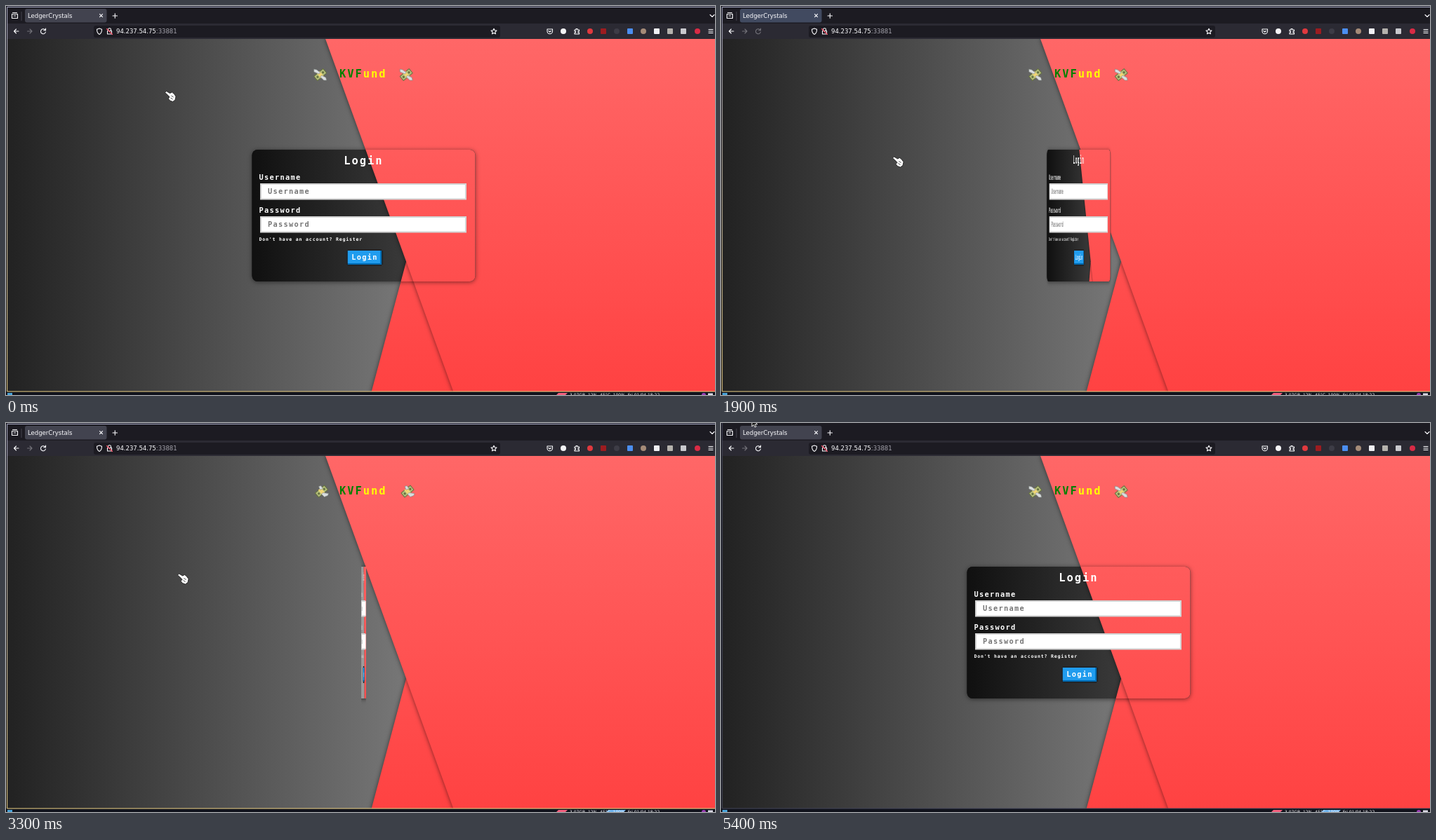
An HTML page that plays this animation: 1010x555 px, repeating every 5.5 s.

```html
<!DOCTYPE html>
<html lang="en">
<head>
<meta charset="utf-8">
<title>LedgerCrystals</title>
<style>
html, body { margin: 0; width: 100%; height: 100%; overflow: hidden; background: #1c1b22; }
svg { display: block; width: 1010px; height: 555px; }
text { font: 8.5px "DejaVu Sans", sans-serif; fill: #fbfbfe; white-space: pre; }
.px { font: bold 10.25px "DejaVu Sans Mono", monospace; letter-spacing: .13em; fill: #fff; }
.big { font-size: 15.4px; }
.small { font-size: 6.5px; }
.hint { fill: #757575; }
.tiny { font-size: 6px; }
.line { fill: none; stroke: #fbfbfe; stroke-width: 1.1; stroke-linecap: round; stroke-linejoin: round; }
.panel { fill: url(#red); filter: drop-shadow(0 0 3px rgba(0,0,0,.55)); }
.plate { filter: drop-shadow(0 1px 3px rgba(0,0,0,.5)); }
</style>
</head>
<body>
<svg id="stage" viewBox="0 0 1010 555"></svg>
<script>
const LOOP = 5500, STEP = 100, MID = 509.5;

const rect = (x, y, w, h, fill, r = 0, more = '') =>
  `<rect x="${x}" y="${y}" width="${w}" height="${h}" rx="${r}" fill="${fill}" ${more}/>`;
const dot = (x, y, r, fill) => `<circle cx="${x}" cy="${y}" r="${r}" fill="${fill}"/>`;
const line = (d, more = '') => `<path class="line" d="${d}" ${more}/>`;
const text = (x, y, s, cls = '', more = '') => `<text x="${x}" y="${y}" class="${cls}" ${more}>${s}</text>`;
const grad = (id, axis, from, to, c1, c2) => {
  const other = axis === 'x' ? 'y' : 'x';
  return `<linearGradient id="${id}" gradientUnits="userSpaceOnUse" ${axis}1="${from}" ${axis}2="${to}"
    ${other}1="0" ${other}2="0"><stop stop-color="${c1}"/><stop offset="1" stop-color="${c2}"/></linearGradient>`;
};

const scene = fill => rect(0, 47, 700, 504, fill) +
  '<path class="panel" d="M570 365L520.200 552H660V365z"/>' +
  '<path class="panel" d="M454.700 46H1020V552H638z"/>';

const field = (label, y) => text(360.5, y, label, 'px') +
  rect(363, y + 6, 292, 21.5, '#fff', 0, 'stroke="#d3d3d3" stroke-width="2"') +
  text(373, y + 20.3, label, 'px hint');

function card(id, title, note, fill) {
  const half = title.length * 3.75 + 7.4, x = 511 - half, w = half * 2;
  return `<g id="${id}">` +
    rect(350.5, 205, 318, 188, fill, 8, 'class="plate"') +
    `<g clip-path="url(#cardClip)">${scene(fill)}</g>` +
    text(MID + .5 - title.length * 5.75, 225.5, title, 'px big') +
    field('Username', 248) + field('Password', 295) +
    text(360.5, 335.3, note, 'px small') +
    rect(x + 2, 347, w - 4, 24, '#212529') + rect(x, 349, w, 20, '#212529') +
    rect(x + 2, 349, w - 4, 20, '#006bb3') + rect(x + 2, 349, w - 6, 18, '#209cee') +
    text(x + 7.5, 362.3, title, 'px') + '</g>';
}

// Winged banknote around its own centre; wings is a path
const note = wings =>
  '<g transform="rotate(-40)">' + rect(-9, -4.5, 18, 9, '#66733f', 1) + rect(-8, -3.5, 16, 7, '#b4bd7c') +
  rect(-2.5, -4.5, 5, 9, '#f2d675') + dot(5, 0, 1.6, '#66733f') + dot(-5, 0, 1.6, '#66733f') + '</g>' +
  `<path d="${wings}" fill="#d9dde0" stroke="#7f857c" stroke-width=".6"/>`;
const pair = (id, x, y, shape) => `<g id="${id}">` +
  [x, x + 122.5].map(p => `<g transform="translate(${p} ${y})">${shape}</g>`).join('') + '</g>';

const dots = [[794, '#f4f4f6'], [832, '#e0393e'], [870, '#3d3c46'], [908, '#a58b78'], [985, '#d92b45']];
const squares = [[851, '#9c1c20'], [889, '#4b8ef0'], [927, '#f0f0f4'], [946, '#b5b2ad'], [965, '#c9c9ce']];

const chrome =
  rect(0, 0, 1010, 26, '#1c1b22') + rect(0, 25, 1010, 22, '#2b2a33') +
  rect(27, 4, 116.5, 19.5, '#42434f', 3, 'id="tab"') + rect(21.5, 8, 1, 13, '#45444e') +
  line('M8.500 11.500h8v6h-8zM9.500 9.500h6M11 14h3') +
  text(31, 17, 'LedgerCrystals', '', 'id="label"') + `<g id="busy">${dot(33, 13.5, 1.3, '#a9b4d8')}</g>` +
  line('M133.500 11.700l4 4m0 -4l-4 4') + line('M152 14h6.500m-3.250 -3.250v6.500') + line('M1003 12.500l3 3 3 -3') +
  line('M18 36h-6.500m3 -3l-3 3 3 3') + line('M30.500 36h6.500m-3 -3l3 3 -3 3', 'opacity=".35"') +
  `<g id="reload">${line('M56 34.500a3.500 3.500 0 1 0 .400 2.500M56.500 32v2.800h-2.800')}</g>` +
  rect(125, 28, 579, 17, '#1c1b22', 3) +
  line('M133 32l3.500 1.300c0 4 -1 6 -3.500 7.200c-2.500 -1.200 -3.500 -3.200 -3.500 -7.200z') +
  line('M144.500 35.500h6v4.500h-6zM145.500 35v-1.200a2 2 0 0 1 4 0v1.200') + line('M143.500 32.500l8 8', 'style="stroke:#ff5068"') +
  text(157, 39.2, '94.237.54.75<tspan fill="#a5a4ad">:33881</tspan>') +
  line('M695 32.200l1.200 2.600 2.800 .300 -2.100 1.900 .600 2.800 -2.500 -1.400 -2.500 1.400 .600 -2.800 -2.100 -1.900 2.800 -.300z') +
  line('M771 33h7.500v3a3.700 3.700 0 0 1 -7.500 0zM773 35.500l1.700 1.700 1.700 -1.700') +
  line('M810 34h2v-1.500h2v1.500h2.500v2h-1.500v2h1.500v2h-6.500v-2h1.500v-2h-1.500z') +
  dots.map(([x, c]) => dot(x, 36, 4, c)).join('') +
  squares.map(([x, c]) => rect(x - 4, 32, 8, 8, c, 1)).join('') +
  line('M1001 33.500h6m-6 2.500h6m-6 2.500h6');

const footer =
  rect(0, 550, 1010, 5, '#11131c') + rect(2, 552, 7, 3, '#4aa3d8') +
  '<path d="M787 552h13l-3 3h-13z" fill="#f2607e"/>' +
  '<path id="load" d="M858 552h25l-3 3h-25z" fill="#6fb4ee"/>' +
  text(803, 557.3, '3.07GB  12%  45°C  100%  Fri 01/04 18:22', 'tiny') +
  dot(994, 555, 3, '#9b3fb5') + rect(1000, 552.5, 7, 3, '#d8d8e4');

stage.innerHTML = '<defs>' +
  grad('red', 'y', 47, 550, '#ff6767', '#ff4242') +
  grad('grey', 'x', 2, 570, '#222', '#777') +
  grad('dark', 'x', 351, 571, '#101010', '#3a3a3a') +
  grad('pale', 'x', 351, 571, '#999', '#9e9e9e') +
  grad('rim', 'y', 0, 550, '#aeb0cc', '#f0d486') +
  `<clipPath id="cardClip">${rect(350.5, 205, 318, 188, '#000', 8)}</clipPath></defs>` +
  scene('url(#grey)') +
  text(475, 101.7, '<tspan fill="#008000">KVF</tspan><tspan fill="#ff0">und</tspan>', 'px big') +
  pair('wingsA', 447.7, 98, note('M-2 -1l-7 -3 0 -4 4 1 5 4zM2 1l6 3 1 4 -4 0 -5 -5z')) +
  pair('wingsB', 449.5, 97.5, note('M-2 -2l-2 -5 3 -1 3 4zM2 2l8 1 -1 3 -5 2 -4 -4z')) +
  card('login', 'Login', "Don't have an account? Register", 'url(#dark)') +
  card('register', 'Register', 'Already have an account? Login', 'url(#pale)') +
  chrome +
  `<g id="status">${rect(2, 538, 176.5, 12, '#202030')}${text(4, 547, '94.237.54.75')}</g>` +
  footer + rect(0, 0, 1.2, 550, '#15151d') +
  '<g id="focus"><path d="M1010 1.500H1.700V550H1010" fill="none" stroke="url(#rim)"/></g>' +
  '<g id="blur">' + rect(1.2, 0, 1, 550, '#45475a') + rect(2, 549.5, 1008, 1, '#45475a') + '</g>' +
  '<path id="hand" d="M0 2.500l2 -2 5 3 3 -1.500 3 2.500 2.500 3.500 -1 5 -3.500 2.500 -4 -1.500 -2.500 -3 2 -2 -1.500 -2zM9 7l3 2M8 10l3 2" fill="#fff" stroke="#111" stroke-width=".800"/>' +
  '<path id="arrow" d="M0 0v11l2.600 -2.500 1.700 3.500 1.800 -.900 -1.700 -3.300h3.500z" fill="#111" stroke="#fff" stroke-width=".900"/>' +
  '<path id="beam" d="M-2 -5h4M0 -5v10M-2 5h4" stroke="#fff" fill="none"/>';

const el = id => document.getElementById(id);
const show = (id, on) => el(id).style.display = on ? '' : 'none';

// CSS "ease" curve
function ease(x) {
  if (x <= 0) return 0;
  if (x >= 1) return 1;
  const curve = (u, a, b) => 3 * (1 - u) * u * ((1 - u) * a + u * b) + u ** 3;
  let lo = 0, hi = 1;
  for (let i = 0; i < 20; i++) {
    const u = (lo + hi) / 2;
    if (curve(u, .25, .25) < x) lo = u; else hi = u;
  }
  return curve(lo, .1, 1);
}

// time, x, y of the pointer tip
const route = [[0, 226.5, 121], [300, 200, 34], [400, 200, 36], [600, 213, 110], [1100, 244.5, 214.5],
  [3950, 244.5, 214.5], [4500, 92, 11], [4800, 46, -4], [5000, 46, -4], [5100, 44, -6], [LOOP, 44, -6]];

function pointer(t) {
  const i = route.findIndex(p => p[0] > t), [t0, x0, y0] = route[i - 1], [t1, x1, y1] = route[i];
  const k = (t - t0) / (t1 - t0), x = x0 + (x1 - x0) * k, y = y0 + (y1 - y0) * k;
  const shape = y > 47 ? 'hand' : y > 28 && x > 125 ? 'beam' : 'arrow';
  for (const id of ['hand', 'beam', 'arrow']) show(id, id === shape);
  el(shape).setAttribute('transform', `translate(${x} ${y})`);
}

function flip(id, c) {
  show(id, c > 0);
  el(id).setAttribute('transform', `translate(${MID} 0) scale(${c} 1) translate(${-MID} 0)`);
}

function draw(t) {
  const turn = Math.cos(Math.PI * (ease((t - 1650) / 1000) - ease((t - 3010) / 1000)));
  flip('login', turn);
  flip('register', -turn);

  const flap = t >= 115 && Math.floor((t - 115) / 310) % 2 === 0;
  show('wingsA', !flap);
  show('wingsB', flap);

  const loading = t >= 1400 && t < 1700;
  show('busy', loading);
  show('status', loading);
  el('label').setAttribute('x', loading ? 43 : 31);
  el('tab').setAttribute('fill', t >= 1700 && t < 2100 ? '#414a60' : '#42434f');
  el('reload').setAttribute('transform', `rotate(${loading ? 130 : 0} 53 36)`);
  el('reload').setAttribute('opacity', t >= 1700 && t < 2400 ? .35 : 1);

  show('load', t >= 2800);
  show('focus', t < 4800);
  show('blur', t >= 4800);
  pointer(t);
}

let start;
function tick(now) {
  start ??= now;
  draw(Math.floor((now - start) % LOOP / STEP) * STEP);
  requestAnimationFrame(tick);
}
draw(0);
requestAnimationFrame(tick);
</script>
</body>
</html>
```
